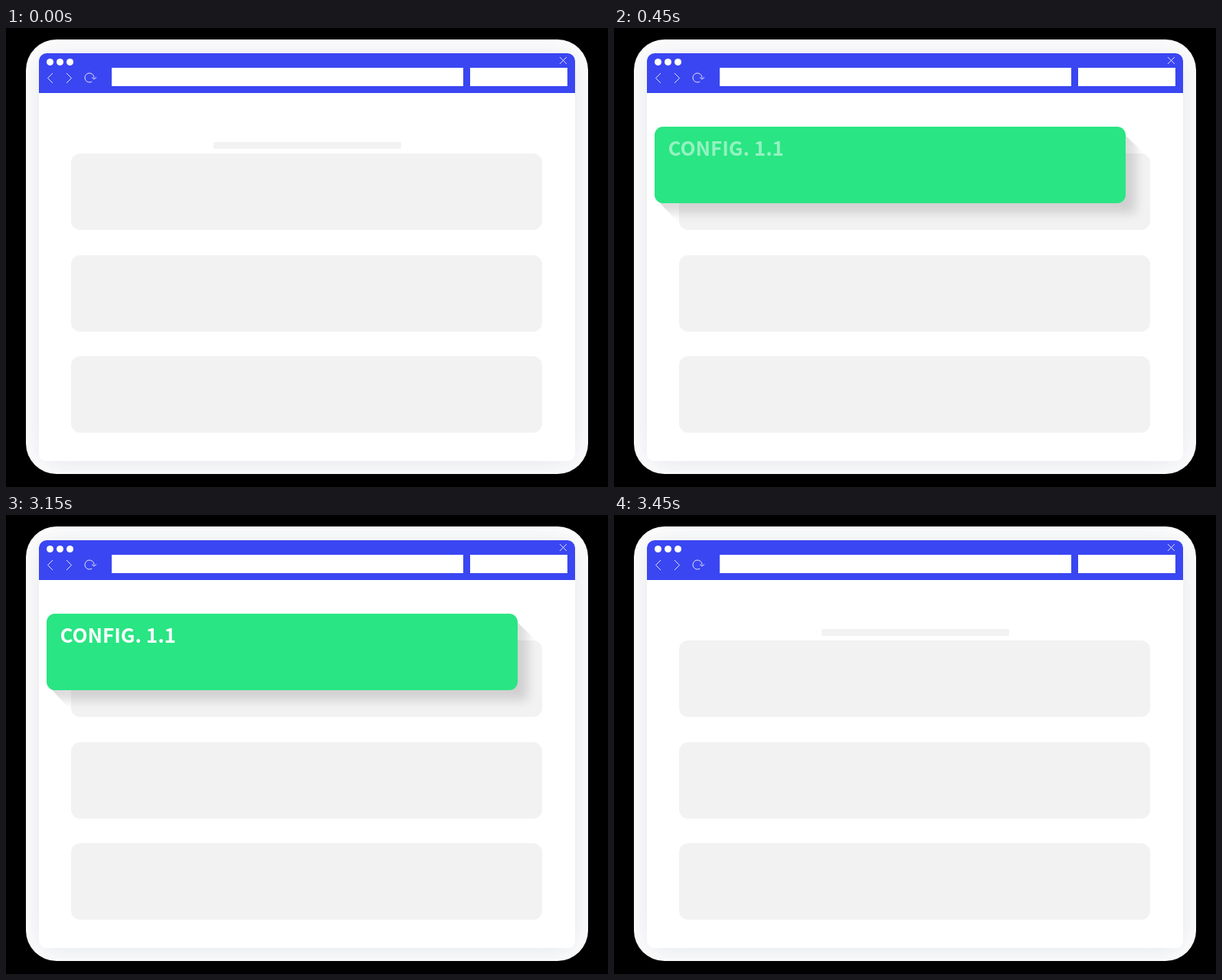
Animation of 786x600 px, one loop 3.55 s. Source, as an HTML page with a canvas:

```html
<!DOCTYPE html>
<html lang="en">
<head>
<meta charset="utf-8">
<title>Config animation</title>
<style>
  html, body { margin: 0; width: 100%; height: 100%; overflow: hidden; background: #000; }
  canvas { display: block; }
</style>
</head>
<body>
<canvas id="stage" width="786" height="600"></canvas>
<script>
const ctx = document.getElementById('stage').getContext('2d');
const LOOP = 3550, STEP = 50, FADE = 6;
const BLUE = '#3a46f1', GREEN = '#29e583', GREY = '#f2f2f2', WHITE = '#fff';
const CODE = [
  "var swipert = new Swiper ('.hiw-titles', {",
  '// Optional parameters',
  'spaceBetween: 1,',
  'centeredSlides: true,',
  "slidesPerView: 'auto',",
  'touchRatio: 1,',
  'slideToClickedSlide: true',
  '});'
];

const clamp = v => Math.max(0, Math.min(1, v));

function roundRect(x, y, w, h, r, fill) {
  ctx.beginPath();
  ctx.roundRect(x, y, w, h, r);
  ctx.fillStyle = fill;
  ctx.fill();
}

function polygon(points) {
  ctx.beginPath();
  points.forEach(([x, y]) => ctx.lineTo(x, y));
}

function line(points) {
  polygon(points);
  ctx.stroke();
}

function disc(x, y, r, fill) {
  ctx.beginPath();
  ctx.arc(x, y, r, 0, Math.PI * 2);
  ctx.fillStyle = fill;
  ctx.fill();
}

function setShadow(color, blur, x = 0, y = 0) {
  ctx.shadowColor = color;
  ctx.shadowBlur = blur;
  ctx.shadowOffsetX = x;
  ctx.shadowOffsetY = y;
}

function withAlpha(alpha, draw) {
  if (alpha <= 0) return;
  ctx.save();
  ctx.globalAlpha = alpha;
  draw();
  ctx.restore();
}

function drawBrowser() {
  ctx.fillStyle = '#000';
  ctx.fillRect(0, 0, 786, 600);

  ctx.save();
  roundRect(26, 15, 734, 568, 40, WHITE);
  ctx.clip();
  setShadow('rgba(45,55,90,0.14)', 40, 0, 3);
  roundRect(43, 33, 700, 533, 9, WHITE);
  ctx.restore();

  roundRect(43, 33, 700, 52, [10, 10, 0, 0], BLUE);
  [57.5, 70.5, 83.5].forEach(x => disc(x, 44.5, 4.5, WHITE));
  ctx.fillStyle = WHITE;
  ctx.fillRect(138, 52, 459, 24);
  ctx.fillRect(606, 52, 127, 24);

  ctx.strokeStyle = 'rgba(255,255,255,0.85)';
  ctx.lineWidth = 1;
  line([[723, 38], [732, 47]]);
  line([[732, 38], [723, 47]]);
  line([[61, 59], [54.5, 65.5], [61, 72]]);
  line([[79, 59], [85.5, 65.5], [79, 72]]);
  ctx.beginPath();
  ctx.arc(109, 65, 6, Math.PI * 0.32, Math.PI * 2.02);
  ctx.stroke();
  line([[112, 64.5], [115, 67], [118, 64.5]]);

  roundRect(271, 149, 245, 9, 2, GREY);
  [164, 297, 429].forEach(y => roundRect(85, y, 615, 100, 12, GREY));
}

function drawBanner() {
  ctx.save();
  polygon([[53, 221], [661, 134], [701, 172], [701, 270], [98, 270]]);
  ctx.clip();
  // Only the blurred shadow lands on the stage
  setShadow('rgba(0,0,0,0.14)', 13, 2000);
  ctx.fillStyle = '#000';
  ctx.fillRect(-1970, 100, 651, 142);
  ctx.restore();
  roundRect(53, 129, 615, 100, 11, GREEN);
}

function drawTitle() {
  ctx.fillStyle = WHITE;
  ctx.font = 'bold 26px "Noto Sans CJK JP", "Noto Sans CJK SC", "Noto Sans CJK", "Open Sans", sans-serif';
  ctx.fillText('CONFIG. 1.1', 70.5, 167);
}

function drawGauge() {
  const cx = 197, cy = 417, slice = Math.PI / 5, top = -Math.PI / 2;
  ctx.strokeStyle = WHITE;
  ctx.lineWidth = 1.4;
  for (let i = 0; i < 10; i++) {
    const a = top + i * slice;
    ctx.beginPath();
    ctx.arc(cx, cy, 43, a, a + slice);
    ctx.arc(cx, cy, 25, a + slice, a, true);
    ctx.closePath();
    ctx.fillStyle = i >= 1 && i <= 3 ? '#1a47fa' : '#7a90fd';
    ctx.fill();
    ctx.stroke();
  }
  disc(cx, cy, 25, WHITE);
  ctx.beginPath();
  ctx.arc(196.5, 416, 26, top + slice, top + 4 * slice, true);
  ctx.strokeStyle = GREEN;
  ctx.lineWidth = 7;
  ctx.stroke();

  ctx.fillStyle = '#3a45dc';
  ctx.font = 'bold 13px "Noto Sans", sans-serif';
  ctx.textAlign = 'center';
  ctx.fillText('70%', 198, 420);
  ctx.textAlign = 'left';
}

function drawCode() {
  ctx.save();
  setShadow('rgba(0,0,0,0.11)', 12, 0, 1);
  roundRect(289, 275, 377, 186, 9, WHITE);
  ctx.restore();
  ctx.fillStyle = '#3a45e8';
  ctx.font = '12px "Noto Sans", sans-serif';
  ctx.letterSpacing = '-0.38px';
  ctx.wordSpacing = '1.9px';
  CODE.forEach((text, i) => ctx.fillText(text, 315, 309 + i * 18));
}

function render(time) {
  const n = Math.floor((time % LOOP) / STEP);
  const fade = (start, end) => clamp(Math.min(n - start, end - n) / FADE);

  drawBrowser();
  withAlpha(fade(0, 69), drawBanner);
  withAlpha(fade(6, 69), drawTitle);
  withAlpha(fade(12, 63), () => {
    drawGauge();
    drawCode();
  });
}

const begin = performance.now();
function tick() {
  render(performance.now() - begin);
  requestAnimationFrame(tick);
}
tick();
</script>
</body>
</html>
```
